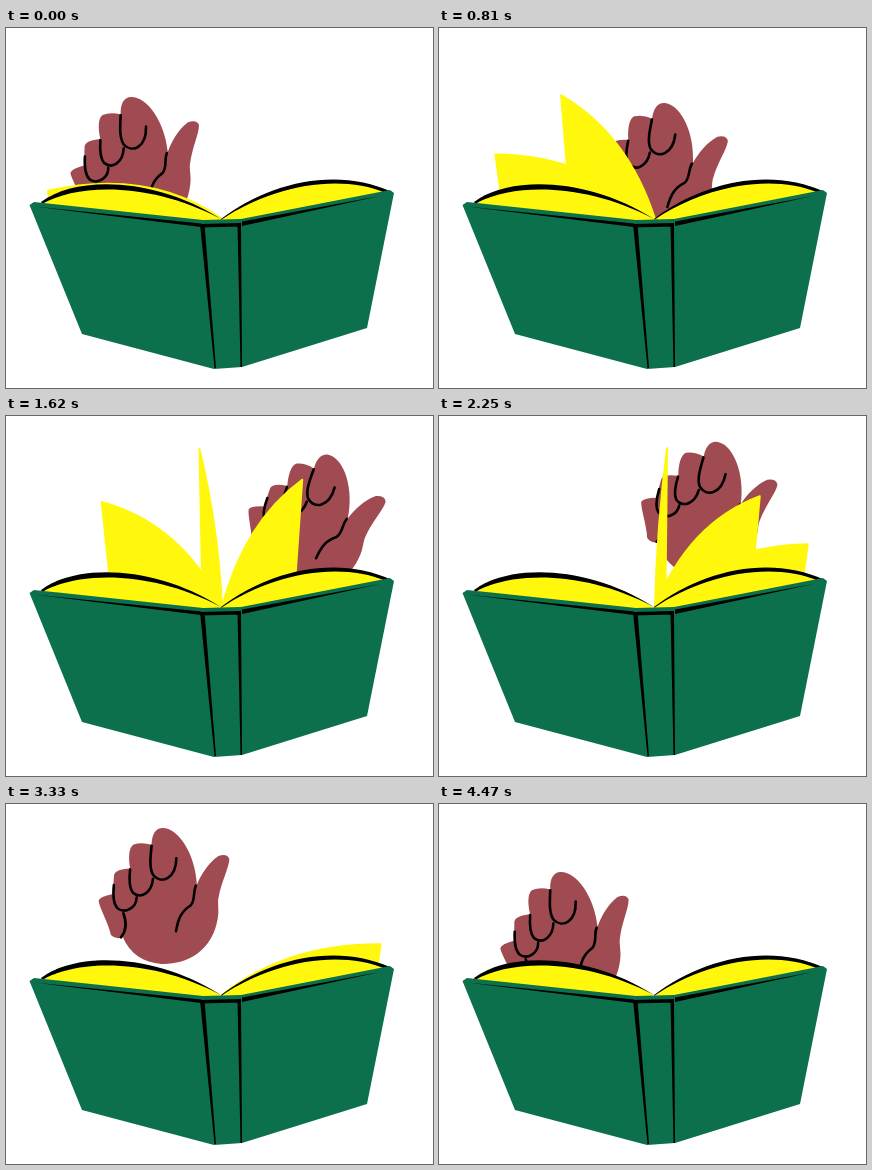
An HTML page for the animation above (4500 ms loop, 427 px wide and 360 px high).

```html
<!DOCTYPE html>
<html lang="en">
<head>
<meta charset="utf-8">
<title>Turning pages</title>
<style>
  html, body { margin: 0; height: 100%; overflow: hidden; background: #fff; }
  svg { display: block; width: 100vw; height: 100vh; }
  .green { fill: #0b704b; }
  .yellow { fill: #fff80c; }
  .crease { fill: none; stroke: #000; stroke-width: 2.6; stroke-linecap: round; stroke-linejoin: round; }
  #pages { stroke: #fff80c; stroke-width: 2; stroke-linejoin: round; }
</style>
</head>
<body>
<svg viewBox="0 0 427 360">
  <!-- The fingertip is the origin of the hand. -->
  <g id="hand"><g transform="translate(-157 -24)">
    <path fill="#a04b52" d="M146 41C146 30 150 24 157 24C173 24 190 50 192 80C196 70 203 58 213 51
      Q222 48 224 54C224 62 216 78 214 92C213 96 214 100 214 108C212 140 190 160 158 160
      C140 159 126 150 119 134Q112 137 107 132C105 122 95 105 94 98Q95 94 108 91L109 72
      Q110 66 125 65C123 55 123 44 128 41Q136 38 146 41Z"/>
    <path class="crease" d="M146 42C145 54 144 64 148 71C157 81 171 74 171 54
      M125 66C124 76 124 84 128 89C136 96 147 89 148 75
      M109 82C108 94 109 101 113 105C121 111 132 104 132 94
      M119 110C123 120 122 128 117 134
      M191 81C188 88 191 96 186 101C177 107 174 114 172 127"/>
  </g></g>
  <path id="pages" class="yellow"/>

  <path class="yellow" d="M35 175C70 150 150 152 215 191L200 196Z
    M216 191C262 157 330 141 385 164L236 196Z"/>
  <path d="M35 174C70 147 150 149 215 191C146 154 72 155 36 176Z
    M215 191C262 155 330 138 386 164L380 165C330 144 262 160 215 192Z"/>
  <path class="green" d="M23.500 177L28 174L197 192L235 191L384 162L388 165L361 300L236 339L208 341L76 306Z"/>
  <path d="M28 178.500L195 195.500V199Z M374 168L236 193.500V198Z
    M194 196L235 195V198.500L194 199.500Z M194 196H198.500L210 340H208.500Z M231.500 196H235L236 339H234.500Z"/>
</svg>
<script>
const LOOP = 4500, PAGE_TIME = 2760, PAGE_DELAY = 480;

// Stops of the fingertip's closed path: time, x, y
const stops = [
  [0, 125, 69], [810, 226, 75], [1620, 323, 39], [1800, 332, 32],
  [2250, 279, 26], [2700, 228, 19], [3330, 157, 24], [4050, 84, 40]
];

function stop(i) {
  const n = stops.length, lap = Math.floor(i / n);
  const [t, x, y] = stops[i - lap * n];
  return [t + lap * LOOP, x, y];
}

// Smooth curve through the stops, with tangents taken from the neighbours.
function fingertip(t) {
  const i = stops.findLastIndex(s => s[0] <= t);
  const [before, a, b, after] = [i - 1, i, i + 1, i + 2].map(stop);
  const span = b[0] - a[0], s = (t - a[0]) / span;
  return [1, 2].map(c => {
    const leave = (b[c] - before[c]) / (b[0] - before[0]);
    const arrive = (after[c] - a[c]) / (after[0] - a[0]);
    return a[c] + (b[c] - a[c]) * s * s * (3 - 2 * s)
      + span * s * (1 - s) * ((1 - s) * leave - s * arrive);
  });
}

// A page swings over the spine: quick in the middle, slow to settle.
function pagePath(age) {
  if (age < 0 || age >= PAGE_TIME) return "";
  const p = (age / PAGE_TIME) ** 0.85;
  const side = -Math.cos(Math.PI * p - 0.12 * Math.sin(2 * Math.PI * p));
  const reach = Math.abs(side);
  const x = 212 + 170 * side;
  const y = 28 + 40 * reach + 65 * reach ** 2 + 30 * reach ** 16;
  const spineX = 216, spineY = 191;
  const bendX = spineX + (x - spineX) * (0.14 + 0.28 * reach);
  const bendY = Math.min(140, spineY + (y - spineY) * (0.5 + 0.55 * reach ** 1.7));
  const footX = x + (200 - y) * (spineX - x) / 1150;
  return `M${spineX} ${spineY}Q${bendX} ${bendY} ${x} ${y}L${footX} 200Z`;
}

const hand = document.getElementById("hand");
const pages = document.getElementById("pages");

function draw() {
  const t = performance.now() % LOOP;
  const [x, y] = fingertip(t);
  const tilt = (x - 145) * 0.087;
  hand.setAttribute("transform", `translate(${x} ${y}) rotate(${tilt})`);
  pages.setAttribute("d", [0, 1, 2].map(i => pagePath(t - i * PAGE_DELAY)).join(""));
  requestAnimationFrame(draw);
}
draw();
</script>
</body>
</html>
```
